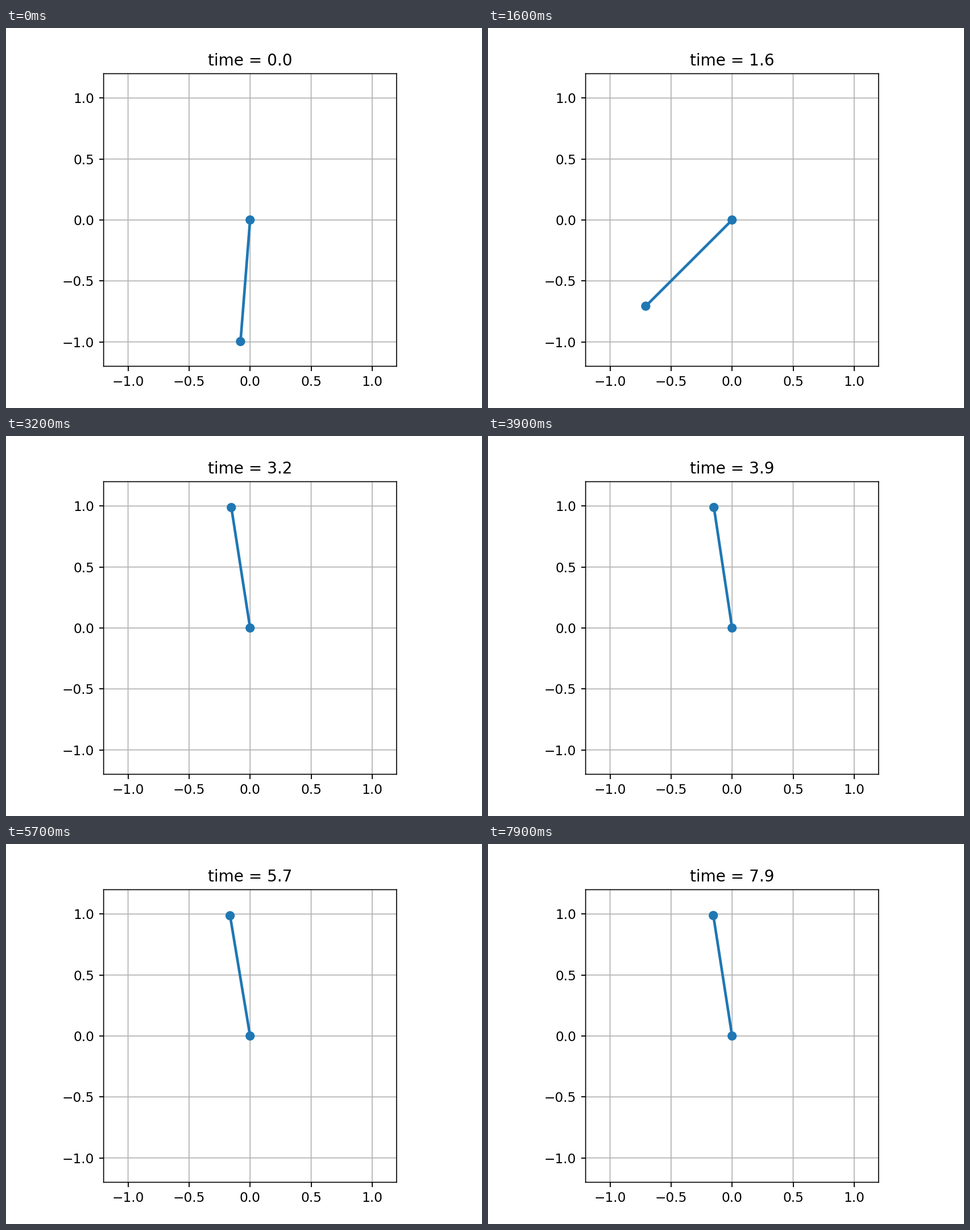
A matplotlib script for the animation above (8 s loop, 837x669 px).

```python
import matplotlib.pyplot as plt
import numpy as np
from matplotlib.animation import FuncAnimation
from matplotlib.patches import Circle

W, H, DPI = 837, 669, 167.4
FRAMES, STEP = 80, 0.1
LIMIT = 1.2

# Swing-up: time, angle from straight down (degrees), speed (degrees/s)
KEYS = [(0, -4.5, 205), (0.85, 107, 0), (1.55, -29.6, -320), (2.5, -167.8, -18)]


def hermite(t, start, end):
    (t0, a0, v0), (t1, a1, v1) = start, end
    h = t1 - t0
    s = (t - t0) / h
    ease = s * s * (3 - 2 * s)
    return (a0 + (a1 - a0) * ease
            + h * v0 * s * (1 - s) ** 2 - h * v1 * s * s * (1 - s))


def angle(t):
    for start, end in zip(KEYS, KEYS[1:]):
        if t < end[0]:
            return np.radians(hermite(t, start, end))
    # Held near the top: the swing dies out, a small wobble remains
    settle = 3 * np.exp(-(t - 2.5) / 0.14)
    wobble = 0.55 * np.sin(8.03 * (t - 3.9) - 1.1)
    return np.radians(-180 + 9.05 + wobble + settle)


# Soft, unsnapped lines
plt.rcParams.update({"path.snap": False, "grid.linewidth": 0.72,
                     "axes.linewidth": 0.72})

# The tiny margin guards against rounding down to one pixel less
fig, ax = plt.subplots(figsize=((W + 1e-6) / DPI, (H + 1e-6) / DPI), dpi=DPI)
fig.subplots_adjust(left=0.1253, right=0.9003, bottom=0.1098, top=0.8798)
ticks = np.arange(-1, 1.1, 0.5)
ax.set(xlim=(-LIMIT, LIMIT), ylim=(-LIMIT, LIMIT), aspect="equal",
       xticks=ticks, yticks=ticks)
ax.grid(True)
title = ax.set_title("time = 0.0")
rod, = ax.plot([], [], lw=2, color="tab:blue")


def dot():
    unit = 0.77 * H / (2 * LIMIT)
    radius = 3.5 * DPI / 72 / unit
    return ax.add_patch(Circle((0, 0), radius, color="tab:blue", lw=0, zorder=3))


pivot, bob = dot(), dot()


def update(i):
    t = i * STEP
    a = angle(t)
    x, y = np.sin(a), -np.cos(a)
    rod.set_data([0, x], [0, y])
    bob.center = x, y
    title.set_text(f"time = {t:.1f}")
    return rod, bob, title


anim = FuncAnimation(fig, update, frames=FRAMES, interval=1000 * STEP,
                     repeat=True, repeat_delay=0)
plt.show()
```
